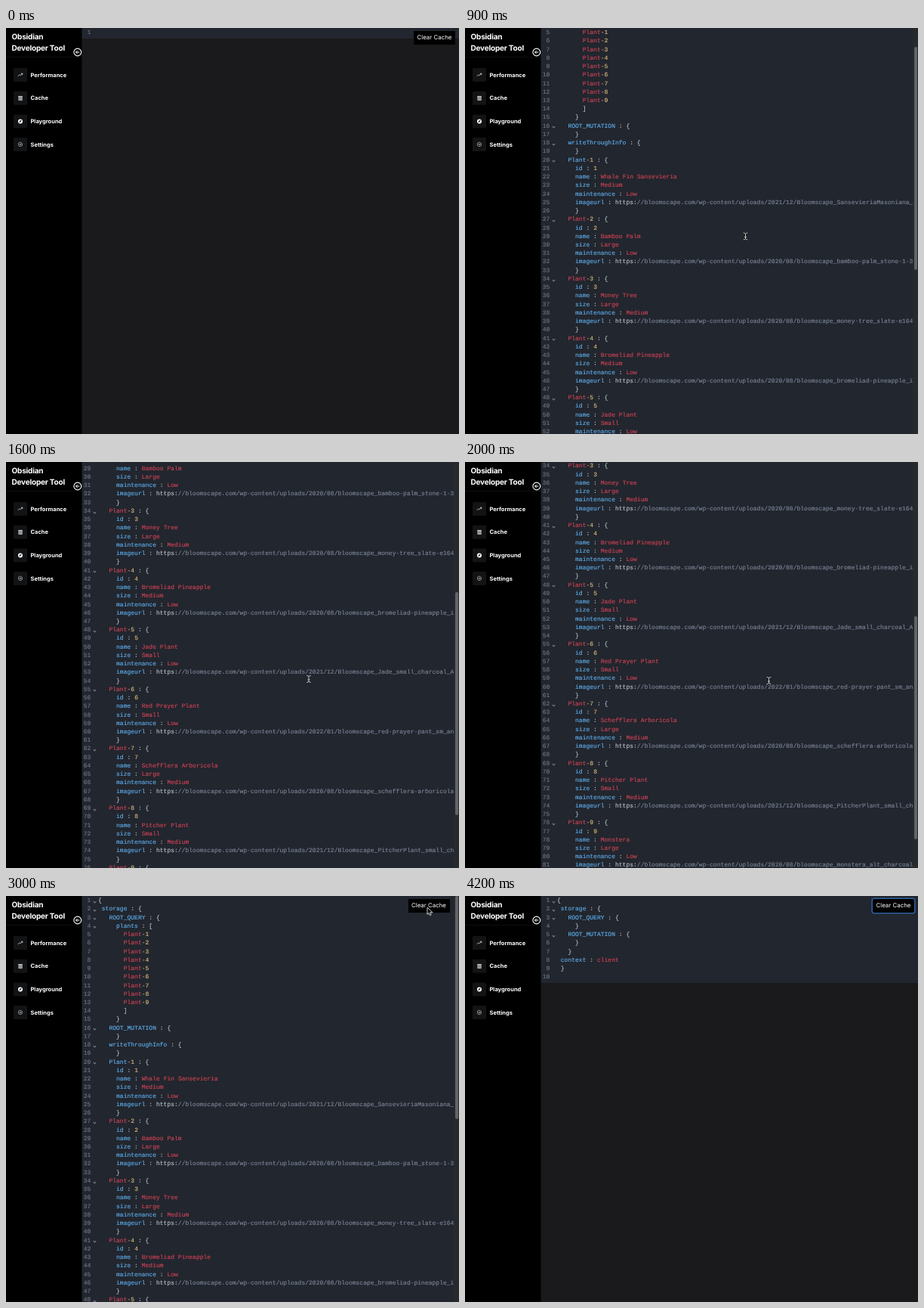
Write an HTML page that moves like this. It is 600 px wide and 537 px high and loops after 4300 ms.

```html
<!DOCTYPE html>
<html lang="en">
<head>
<meta charset="utf-8">
<title>Obsidian Developer Tool</title>
<style>
html, body { margin: 0; width: 100%; height: 100%; overflow: hidden; background: #1a191b; }
body { position: relative; text-rendering: geometricPrecision; }
body > *, #page > * { position: absolute; }
#page { left: 100px; top: 0; right: 0; height: 537px; overflow: hidden; }
.editor { left: 0; top: 0; right: 0; padding: 1.2px 0 1.4px; background: #22262e; overflow: hidden;
  font: 8.02px/11.235px "Liberation Mono", monospace; color: #bcc2cc; -webkit-text-stroke: .12px; }
#full { right: 7px; }
.line { position: relative; height: 11.235px; white-space: pre; }
.line i { position: absolute; right: calc(100% - 12.4px); font-style: normal; color: #717987; }
.line span { position: absolute; left: 22px; }
.line u { position: absolute; left: 15.6px; top: 4.6px; width: 2px; height: 2px; transform: rotate(45deg);
  border: solid #848b97; border-width: 0 .8px .8px 0; }
.line b { font-weight: 400; }
.key { color: #61b2f2; } .word { color: #d24457; } .num { color: #e5c07b; } .note { color: #7d8799; }
#clear { top: 4px; width: 55px; height: 17.5px; background: #000; color: #fff; border-radius: 1px;
  font: 7.9px/17.5px Inter, sans-serif; text-align: center; white-space: nowrap; }
#clear.focus { box-shadow: 0 0 0 1.6px #2d5f9e; border-radius: 2px; }
#track { right: 0; top: 0; width: 7px; height: 537px; background: #27292d; }
#thumb { position: absolute; left: 1.5px; width: 4px; height: 295px; border-radius: 2px; background: #626468; }
svg { left: 0; top: 0; width: 600px; height: 537px; }
svg text { font-family: Inter, sans-serif; font-weight: 700; fill: #fff; }
</style>
</head>
<body>
<div id="page">
  <div class="editor" id="empty"></div>
  <div class="editor" id="full"></div>
  <div class="editor" id="cleared"></div>
  <div id="clear">Clear Cache</div>
  <div id="track"><div id="thumb"></div></div>
</div>
<svg viewBox="0 0 600 537" fill="none" stroke-linecap="round" stroke-linejoin="round">
  <path fill="#000" d="M0 0h100.5v537H0z"/>
  <path stroke="#141416" stroke-width=".8" d="M0 38.5H100"/>
  <g font-size="10.1" letter-spacing="-.25"><text x="7.5" y="14.6">Obsidian</text><text x="7.5" y="29.8">Developer Tool</text></g>
  <g fill="#121314"><rect x="10" y="53" width="18" height="18" rx="1.5"/><rect x="10" y="83.7" width="18" height="18" rx="1.5"/><rect x="10" y="114.4" width="18" height="18" rx="1.5"/><rect x="10" y="145" width="18" height="18" rx="1.5"/></g>
  <g font-size="7.5"><text x="32.5" y="64.7">Performance</text><text x="32.5" y="95.4">Cache</text><text x="32.5" y="126">Playground</text><text x="32.5" y="156.7">Settings</text></g>
  <path stroke="#ddd" stroke-width=".8" d="M16 63.6l2-2 1.3 1.2 2.5-2.6M20.3 60.2h1.5v1.5"/>
  <path stroke="#eee" stroke-width="1.3" stroke-linecap="butt" d="M16.3 90.6h5.4M16.8 92.7h4.6M16.8 94.9h4.6"/>
  <path stroke="#aaa" stroke-width=".7" d="M16.8 90.6v5h4.6v-5"/>
  <circle cx="19" cy="123.4" r="3" fill="#fff"/><path fill="#121314" d="M20.8 121.6l-1.2 2.4-2.4 1.2 1.2-2.4z"/>
  <path stroke="#aaa" stroke-width=".8" d="M19 151.2l2.4 1.4v2.8L19 156.8l-2.4-1.4v-2.8z"/><circle cx="19" cy="154" r=".9" stroke="#aaa" stroke-width=".7"/>
  <circle cx="94.8" cy="32" r="4.9" fill="#000" stroke="#fff" stroke-width="1.1"/>
  <path stroke="#fff" stroke-width="1" d="M97 32h-4.3M94.5 30.1L92.6 32l1.9 1.9"/>
  <defs><path id="beamShape" d="M-2.5-4.5Q0-4.5 0-3Q0-4.5 2.5-4.5M0-3V3M-2.5 4.5Q0 4.5 0 3Q0 4.5 2.5 4.5M-1.2 1H1.2"/></defs>
  <g id="beam"><use href="#beamShape" stroke="#16181c" stroke-width="2.2"/><use href="#beamShape" stroke="#d8d8d8" stroke-width=".9"/></g>
  <path id="arrow" fill="#000" stroke="#fff" stroke-width=".8" d="M0 0v9l2.1-1.9 1.4 3.2 1.6-.7-1.4-3.1h2.8z"/>
</svg>
<script>
const $ = id => document.getElementById(id);
const LOOP = 4300, STEP = 100, LOADED = 200, FOCUSED = 3100, CLEARED = 3200;

// name, size, maintenance, image path
const plants = [
  ['Whale Fin Sansevieria', 'Medium', 'Low', '2021/12/Bloomscape_SansevieriaMasoniana_'],
  ['Bamboo Palm', 'Large', 'Low', '2020/08/bloomscape_bamboo-palm_stone-1-3'],
  ['Money Tree', 'Large', 'Medium', '2020/08/bloomscape_money-tree_slate-e164'],
  ['Bromeliad Pineapple', 'Medium', 'Low', '2020/08/bloomscape_bromeliad-pineapple_i'],
  ['Jade Plant', 'Small', 'Low', '2021/12/Bloomscape_Jade_small_charcoal_A'],
  ['Red Prayer Plant', 'Small', 'Low', '2022/01/bloomscape_red-prayer-pant_sm_an'],
  ['Schefflera Arboricola', 'Large', 'Medium', '2020/08/bloomscape_schefflera-arboricola'],
  ['Pitcher Plant', 'Small', 'Medium', '2021/12/Bloomscape_PitcherPlant_small_ch'],
  ['Monstera', 'Large', 'Low', '2020/08/bloomscape_monstera_alt_charcoal'],
];
const block = (name, body = []) => [`   ${name} : {`, ...body.map(s => '     ' + s), '     }'];
const cacheText = body => ['{', ' storage : {', ...body, '   }', ' context : client', ' }', ''];
const fullLines = cacheText([
  ...block('ROOT_QUERY', ['plants : [', ...plants.map((_, i) => `  Plant-${i + 1}`), '  ]']),
  ...block('ROOT_MUTATION'),
  ...block('writeThroughInfo'),
  ...plants.flatMap(([name, size, care, path], i) => block(`Plant-${i + 1}`, [
    `id : ${i + 1}`, `name : ${name}`, `size : ${size}`, `maintenance : ${care}`,
    `imageurl : https://bloomscape.com/wp-content/uploads/${path}`])),
]);
const clearedLines = cacheText([...block('ROOT_QUERY'), ...block('ROOT_MUTATION')]);

const token = /(\/\/.*)|https:|([A-Za-z_]+(?= :)|^ {3}Plant(?=-1 :))|([A-Za-z]+)|(\d+)/g;
const classes = ['note', 'key', 'word', 'num'];
const highlight = text => text.replace(token, (part, ...groups) => {
  const kind = classes[groups.slice(0, 4).findIndex(Boolean)];
  return kind ? `<b class="${kind}">${part}</b>` : part;
});
const render = lines => lines.map((text, i) =>
  `<div class="line"><i>${i + 1}</i>${/[{[]$/.test(text) ? '<u></u>' : ''}<span>${highlight(text)}</span></div>`).join('');
$('empty').innerHTML = render(['']);
$('full').innerHTML = render(fullLines);
$('cleared').innerHTML = render(clearedLines);

// keys: [time, ...values], linear between
function track(keys, t) {
  const n = keys.findIndex(k => k[0] > t);
  if (n < 0) return keys.at(-1).slice(1);
  if (n === 0) return keys[0].slice(1);
  const a = keys[n - 1], b = keys[n], p = (t - a[0]) / (b[0] - a[0]);
  return a.slice(1).map((v, i) => v + (b[i + 1] - v) * p);
}
const scrollKeys = [[600, 0], [900, 45], [1300, 185], [1600, 312], [1800, 390], [2000, 371.5], [2300, 0]];
const pointerKeys = [[300, 345, 268], [900, 371.5, 275.5], [1600, 401, 287], [2000, 402.5, 289], [2400, 405.5, 288],
  [2600, 440, 215], [2900, 556, 16], [3200, 562, 14], [3400, 482, 91], [3600, 500, 148]];

const show = (id, on) => $(id).style.display = on ? '' : 'none';
function draw(t) {
  const loaded = t >= LOADED && t < CLEARED, cleared = t >= CLEARED;
  const [scroll] = track(scrollKeys, t);
  show('empty', t < LOADED);
  show('full', loaded);
  show('cleared', cleared);
  show('track', loaded);
  $('full').style.top = -scroll + 'px';
  $('thumb').style.top = scroll * .55 + 'px';
  const button = $('clear');
  button.style.right = (loaded ? 12.5 : 5) + 'px';
  button.style.transform = `translateY(${-scroll}px)`;
  button.className = t >= FOCUSED ? 'focus' : '';

  const [x, y] = track(pointerKeys, t), visible = t >= 300 && t < 3800;
  const arrow = (y < 22 && x > 530) || (cleared && y > 115);
  show('beam', visible && !arrow);
  show('arrow', visible && arrow);
  for (const id of ['beam', 'arrow']) $(id).setAttribute('transform', `translate(${x} ${y})`);
}
const start = performance.now();
function tick() {
  const t = (performance.now() - start) % LOOP;
  draw(Math.floor(t / STEP) * STEP);
  requestAnimationFrame(tick);
}
tick();
</script>
</body>
</html>
```
